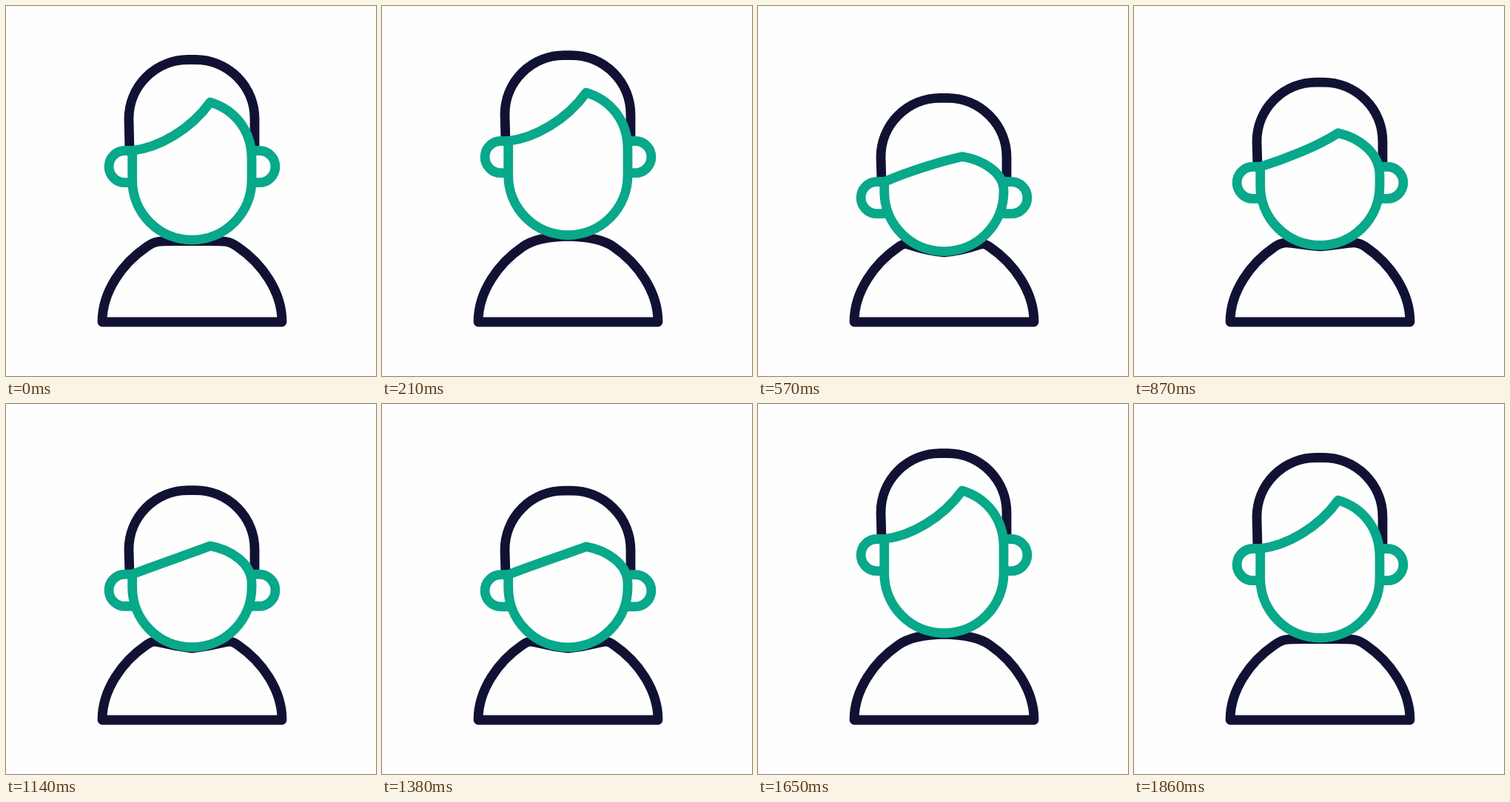
An HTML page for the animation above (2070 ms loop, 500 by 500 pixels).

```html
<!DOCTYPE html>
<html lang="en">
<head>
<meta charset="utf-8">
<title>Nodding person</title>
<style>
  html, body { margin: 0; height: 100%; overflow: hidden; background: #fefefe; }
  svg { display: block; width: 100vw; height: 100vh; }
  path { fill: none; stroke: #111233; stroke-width: 12.8; stroke-linejoin: round; }
  .green { stroke: #08a88a; }
  #face { fill: #fefefe; }
</style>
</head>
<body>
<svg viewBox="0 0 500 500">
  <path id="body"/>
  <path id="hair"/>
  <path id="ears" class="green"/>
  <path id="face" class="green"/>
</svg>
<script>
const STEP = 30, STEPS = 69, MOVING = 62;
const LIFT = 7, SWING = 12;            // steps per lift and per half nod
const NODS = [0, 1, 0.61, 1, 0];

const clamp = (v, max) => Math.max(0, Math.min(max, v));
const ease = t => t < 0.5 ? 2 * t * t : 1 - 2 * (1 - t) ** 2;
const setPath = (id, d) => document.getElementById(id).setAttribute("d", d);

// 0 = head upright, 1 = head fully bowed
function nodAt(step) {
  const x = clamp((step - LIFT) / SWING, NODS.length - 1);
  const i = Math.min(Math.floor(x), NODS.length - 2);
  return NODS[i] + (NODS[i + 1] - NODS[i]) * ease(x - i);
}

function draw(now) {
  const step = Math.floor(now / STEP) % STEPS;
  const nod = nodAt(step);
  const lift = ease(clamp(Math.min(step, MOVING - step) / LIFT, 1));
  const drop = 55 * nod - 13 * lift;

  const ear = 195.5 + drop;
  const tip = ear - 65.5 + 31.5 * nod;
  const chin = 316 + drop / 2 - 5.5 * nod;
  const jaw = chin - 80.5;
  const crown = 72.5 + 0.45 * drop + 33 * nod;
  const neck = chin + 1.5;
  const bendX = 208 - 1.5 * drop + 54 * nod;
  const bendY = 318 + drop / 2 - 12 * nod;

  setPath("body", `M130 427C130 386 157 348 190 325.5C204 315.5 ${bendX} ${bendY} 251.5 ${neck}
    C${503 - bendX} ${bendY} 299 315.5 313 325.5C346 348 373 386 373 427Z`);
  setPath("hair", `M167 ${ear}L166 ${crown + 80}a80 80 0 0 1 80 -80h10a80 80 0 0 1 80 80V${ear}`);
  setPath("ears", `M171 ${ear}H160.7a21.6 21.6 0 0 0 0 43.2H176
    M332 ${ear}H342.3a21.6 21.6 0 0 1 0 43.2H328`);
  setPath("face", `M170.7 ${ear}C206 ${ear - 4 - 11 * nod} 249 ${ear - 28} 276 ${tip}
    C${309 - 8 * nod} ${tip + 10 - 6 * nod} 332 ${tip + 38 - 18 * nod} 332 ${tip + 76 - 30 * nod}
    V${jaw}A80.6 80.5 0 0 1 170.7 ${jaw}Z`);
  requestAnimationFrame(draw);
}
draw(performance.now());
</script>
</body>
</html>
```
